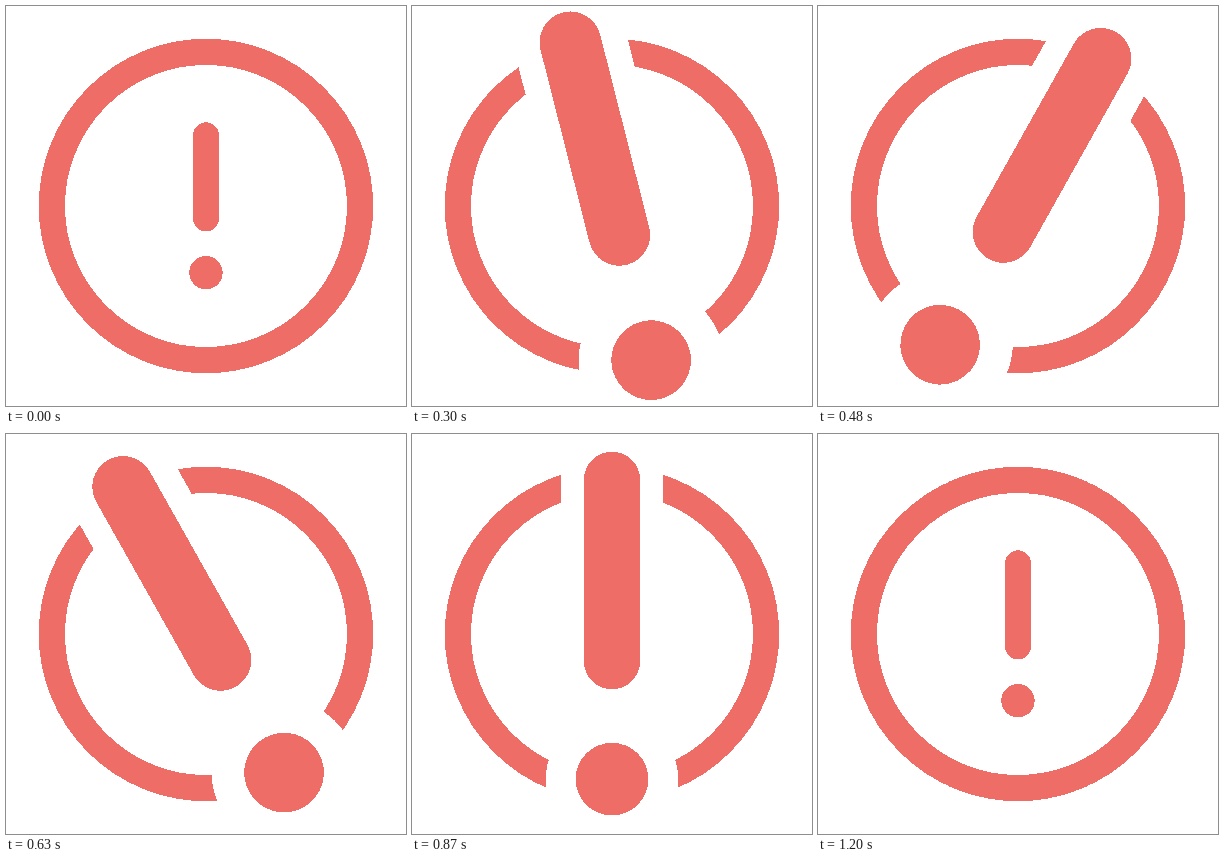
Animation of 400 by 400 pixels, one loop 1230 ms. Source, as an HTML page:

```html
<!DOCTYPE html>
<html lang="en">
<head>
<meta charset="utf-8">
<title>Alert</title>
<style>
  html, body { margin: 0; width: 100%; height: 100%; overflow: hidden; background: #fff; }
  svg { display: block; width: 100%; height: 100%; shape-rendering: crispEdges; }
  line { stroke-linecap: round; }
</style>
</head>
<body>
<svg viewBox="-200 -200 400 400">
  <circle r="154.1" fill="none" stroke="#ee6d66" stroke-width="26.2"/>
  <g id="mark">
    <!-- white halo that cuts the ring -->
    <line y1="-70.8" y2="12.5" stroke="#fff" stroke-width="47.2"/>
    <circle cy="66.67" r="30.4" fill="#fff"/>
    <line y1="-70.8" y2="12.5" stroke="#ee6d66" stroke-width="25.8"/>
    <circle cy="66.67" r="16.7" fill="#ee6d66"/>
  </g>
</svg>
<script>
const PERIOD = 1230, STEP = 30;
const mark = document.getElementById('mark');

// Keyframes as [ms, value]
const scaleKeys = [[0, 1], [246, 2.386], [800, 2.386], [1086, 1]];
const angleKeys = [[241, 0], [363, -30], [488, 30], [614, -30], [803, 0]];

const ease = s => s * s * (3 - 2 * s);

function valueAt(keys, t) {
  if (t <= keys[0][0]) return keys[0][1];
  for (let i = 1; i < keys.length; i++) {
    const [t0, a] = keys[i - 1], [t1, b] = keys[i];
    if (t < t1) return a + (b - a) * ease((t - t0) / (t1 - t0));
  }
  return keys[keys.length - 1][1];
}

function draw(now) {
  const t = Math.floor((now % PERIOD) / STEP) * STEP;
  mark.setAttribute('transform', `rotate(${valueAt(angleKeys, t)}) scale(${valueAt(scaleKeys, t)})`);
}

const start = performance.now();
function tick() {
  draw(performance.now() - start);
  requestAnimationFrame(tick);
}
tick();
</script>
</body>
</html>
```
